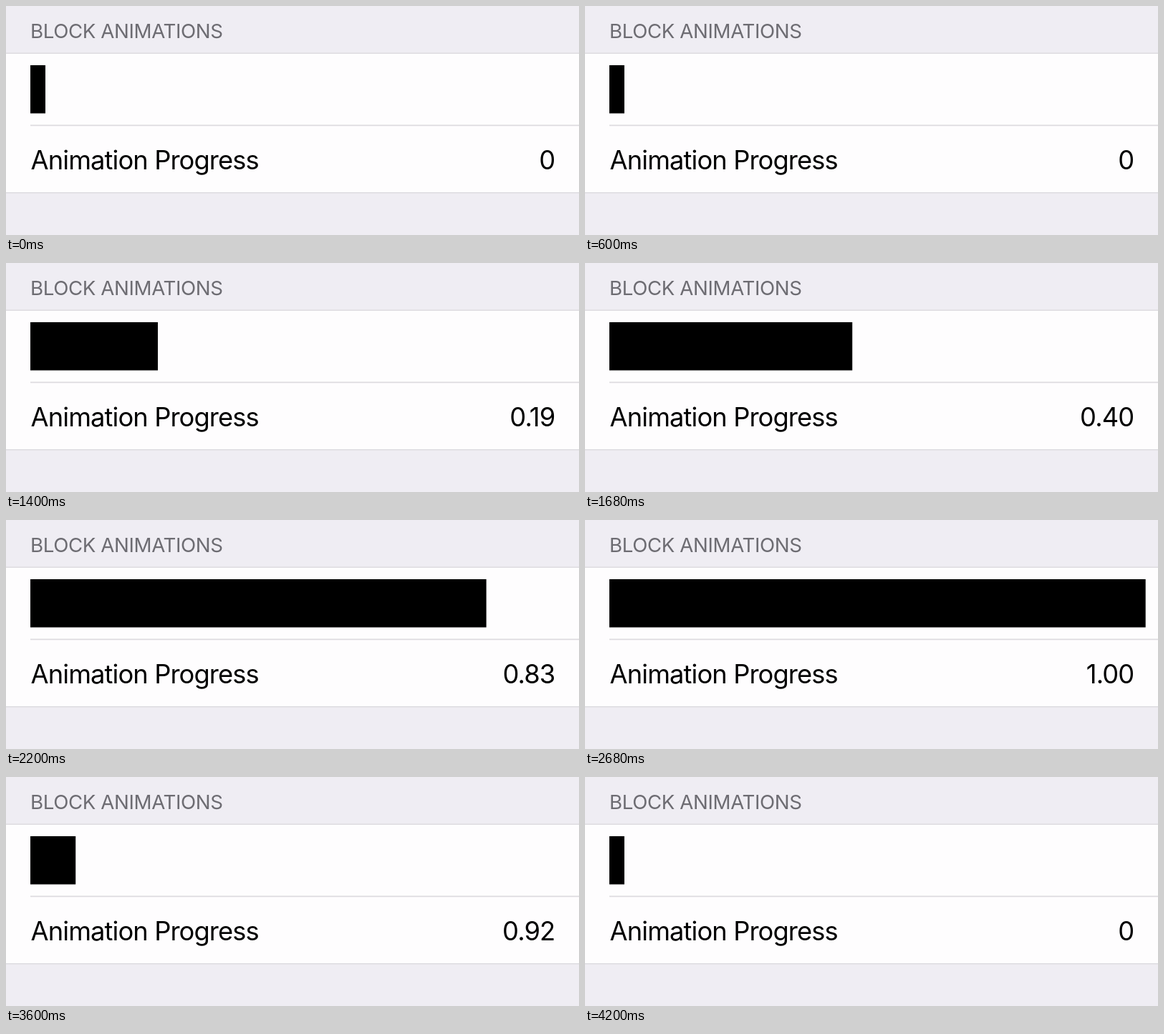
Animation of 800 by 321 pixels, one loop 4.36 s. Source, as an HTML page:

```html
<!DOCTYPE html>
<html lang="en">
<head>
<meta charset="utf-8">
<title>Block animations</title>
<style>
  html, body { margin: 0; width: 100%; height: 100%; overflow: hidden; background: #efedf3; }
  svg { display: block; width: 800px; height: 321px; }
  text { font: 36.3px Inter, sans-serif; letter-spacing: -.9px; }
  .header { font-size: 27.7px; letter-spacing: -.4px; fill: #6d6c72; }
  .line { stroke: #dddbe0; stroke-width: 1.6; }
</style>
</head>
<body>
<svg viewBox="0 0 800 321">
  <rect width="800" height="321" fill="#efedf3"/>
  <rect y="66" width="800" height="196" fill="#fefdfe"/>
  <path class="line" d="M0 66.2H800M34 167.4H800M0 261.8H800"/>
  <text class="header" x="34" y="45">BLOCK ANIMATIONS</text>
  <rect id="bar" x="34" y="83" width="21" height="67.5"/>
  <text x="34.6" y="229.3">Animation Progress</text>
  <text id="value" x="766.3" y="229.3" text-anchor="end">0</text>
</svg>
<script>
const LOOP = 4360, STEP = 40;
const MIN_WIDTH = 21, MAX_WIDTH = 750;
const bar = document.getElementById('bar');
const value = document.getElementById('value');

// cubic-bezier(.42, 0, .58, 1), solved for its parameter by bisection
function easeInOut(x) {
  if (x <= 0) return 0;
  if (x >= 1) return 1;
  let low = 0, high = 1, s;
  for (let i = 0; i < 24; i++) {
    s = (low + high) / 2;
    const r = 1 - s;
    if (1.26 * s * r * r + 1.74 * s * s * r + s ** 3 < x) low = s;
    else high = s;
  }
  return s * s * (3 - 2 * s);
}

const progress = (t, start, duration) => easeInOut((t - start) / duration);

// The label trails the bar slightly and restarts for the way back
function labelAt(t) {
  if (t < 800 || t >= 3800) return '0';
  const p = t < 2800 ? progress(t, 815, 1950) : progress(t, 2826, 965);
  return p.toFixed(2);
}

function draw(now) {
  const t = Math.floor(now % LOOP / STEP) * STEP;
  const extent = progress(t, 765, 1976) - progress(t, 2785, 981);
  bar.setAttribute('width', MIN_WIDTH + (MAX_WIDTH - MIN_WIDTH) * extent);
  value.textContent = labelAt(t);
}

const origin = performance.now();
function tick() {
  draw(performance.now() - origin);
  requestAnimationFrame(tick);
}
tick();
</script>
</body>
</html>
```
